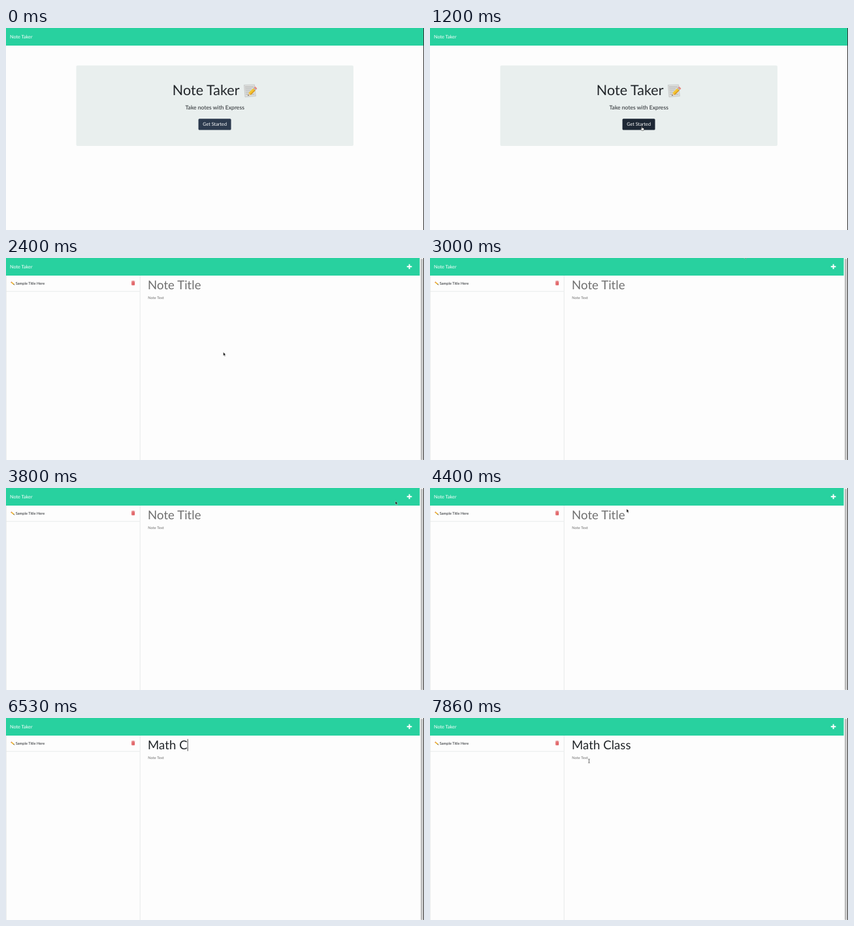
Animation of 640x310 px, one loop 8000 ms. Source, as an HTML page:

```html
<!DOCTYPE html>
<html lang="en">
<head>
<meta charset="utf-8">
<title>Note Taker</title>
<style>
  html, body { margin: 0; width: 100%; height: 100%; overflow: hidden; background: #fdfdfd; }
  svg { display: block; width: 100vw; height: 100vh; }
  text { font-family: Lato, sans-serif; fill: #212529; white-space: pre; text-rendering: geometricPrecision; }
  .middle { text-anchor: middle; }
  .light { fill: #fff; }
  .hint { fill: #707070; }
</style>
</head>
<body>
<svg viewBox="0 0 640 310">
  <rect width="640" height="310" fill="#fdfdfd"/>
  <rect id="bar" width="639" height="27" fill="#28d19f"/>
  <text class="light" x="6" y="16" font-size="7.25">Note Taker</text>

  <g id="home">
    <rect x="107.5" y="57.5" width="424.5" height="123.5" rx="2" fill="#e9efee"/>
    <text x="254.8" y="102.8" font-size="21.6">Note Taker</text>
    <g id="memo">
      <path d="M364.5 87.5L380.5 87L382.5 104.5L366 106Z" fill="#dcdddb" stroke="#b9bcba" stroke-width=".6"/>
      <path d="M366 90.5h13M366.3 93.3h10M366.6 96.1h8M366.9 98.9h5M367.2 101.7h13" stroke="#a5a8a8" stroke-width=".8"/>
      <g transform="translate(370.3 104) rotate(-45)">
        <path d="M0 0L4.4 -2.4V2.4Z" fill="#e9c99b"/>
        <path d="M0 0L1.6 -.9V.9Z" fill="#333"/>
        <rect x="4" y="-2.4" width="10" height="4.8" fill="#f5c52f"/>
        <rect x="4" y=".8" width="10" height="1.6" fill="#d99a22"/>
        <rect x="14" y="-2.4" width="1.6" height="4.8" fill="#b3b6b8"/>
        <rect x="15.6" y="-2.4" width="2.4" height="4.8" rx="1" fill="#e58a84"/>
      </g>
    </g>
    <text class="middle" x="319.7" y="124.8" font-size="8.65">Take notes with Express</text>
    <rect id="ring" x="294" y="138.5" width="51" height="18.8" rx="2" fill="none" stroke="#6b7889" stroke-width="1.4"/>
    <rect id="button" x="294.6" y="139.2" width="50" height="17.4" rx="1.6"/>
    <text class="middle light" x="319.6" y="150.4" font-size="7.3">Get Started</text>
  </g>

  <g id="notes">
    <rect x="633.7" width="6.3" height="310" fill="#f3f3f3"/>
    <rect x="635.1" y="1" width="3.2" height="309" rx="1.6" fill="#bdbdbd"/>
    <path d="M.3 27V310M205.3 27V310M0 51.2H205" stroke="#dfe2e3" stroke-width=".7"/>
    <path d="M617.6 9.4V17M613.8 13.2H621.4" stroke="#fff" stroke-width="1.9"/>
    <g transform="translate(8 36.7) rotate(40)">
      <rect width="5" height="1.9" y="-.7" fill="#efb92d"/>
      <rect width="1" height="1.9" y="-.7" fill="#de817a"/>
      <path d="M5 -.7L7.4 .25L5 1.2Z" fill="#6b5535"/>
    </g>
    <text x="14.7" y="41.2" font-size="5.75">Sample Title Here</text>
    <g fill="#dc4b4f">
      <path d="M191.9 35.5H193.4L193.8 35H195.6L196 35.5H197.5V36.3H191.9Z"/>
      <path d="M192.3 36.7H197.1V41Q197.1 41.7 196.5 41.7H192.9Q192.3 41.7 192.3 41Z"/>
      <path d="M193.5 37.5V41M194.7 37.5V41M195.9 37.5V41" stroke="#f2b5b5" stroke-width=".4"/>
    </g>
    <text id="title" x="217" y="48.3" font-size="18.7"></text>
    <text class="hint" x="217.3" y="63" font-size="5.75">Note Text</text>
    <rect id="caret" width=".8" fill="#222"/>
  </g>
  <path d="M639.5 0V310" stroke="#333"/>

  <g id="cursor">
    <path id="arrow" d="M0 0V5.5L1.3 4.4L2.2 6.4L3.1 6L2.2 4H3.9Z" fill="#111" stroke="#fff" stroke-width=".4"/>
    <path id="hand" d="M-1.2 .5V-2.8Q-.7 -3.5 -.2 -2.8V-.6Q.5 -1.1 .9 -.4Q1.5 -.8 1.9 -.1Q2.7 -.2 2.7 .6V1.6L1.9 3.2H-.9L-2.5 1Q-2.3 .1 -1.2 .8Z" fill="#fff" stroke="#111" stroke-width=".55"/>
    <path id="beam" d="M-1.2 -3Q0 -3 0 -2.4Q0 -3 1.2 -3M0 -2.4V2.4M-1.2 3Q0 3 0 2.4Q0 3 1.2 3" fill="none" stroke="#333" stroke-width=".7"/>
  </g>
</svg>
<script>
const LOOP = 8000, PAGE_AT = 2400, FOCUS_AT = 5400;
const $ = id => document.getElementById(id);

// Pointer stops: time, x, y
const path = [
  [60, 334, 289], [860, 327, 160], [1000, 326, 155], [1200, 325, 154], [1460, 324, 153.5],
  [2000, 324, 153.5], [2330, 323, 153.5], [2730, 440, 46], [2860, 452, 36], [3000, 481, -5],
  [3270, 481, -5], [3660, 627, 19], [3740, 627, 19], [4060, 303, 29], [4200, 302, 29],
  [4400, 301, 32], [4860, 274, 53], [4940, 274, 53], [5130, 274, 43], [7530, 243.5, 66]
];
// Pointer shapes by start time
const shapes = [[0, ""], [60, "arrow"], [930, "hand"], [PAGE_AT, "arrow"], [4600, "beam"], [FOCUS_AT, ""], [7530, "beam"]];
const titles = [
  [0, "Note Title"], [5460, "M"], [5530, "Ma"], [5730, "Mat"], [5860, "Math"], [6130, "Math "],
  [6330, "Math C"], [6800, "Math Cl"], [6930, "Math Cla"], [7060, "Math Clas"], [7200, "Math Class"]
];

const clamp = v => Math.min(1, Math.max(0, v));
const mix = (a, b, k) => a + (b - a) * k;
const latest = (list, t) => list.findLast(item => item[0] <= t);
const show = (id, on) => $(id).style.display = on ? "" : "none";

function pointerAt(t) {
  const next = path.findIndex(p => p[0] > t);
  if (next === 0) return path[0].slice(1);
  if (next < 0 || path[next][0] === 7530) return path.at(next < 0 ? -1 : next - 1).slice(1);
  const [a, b] = [path[next - 1], path[next]];
  const k = (t - a[0]) / (b[0] - a[0]), eased = k * k * (3 - 2 * k);
  return [mix(a[1], b[1], eased), mix(a[2], b[2], eased)];
}

function drawTitle(t) {
  const text = latest(titles, t)[1], title = $("title");
  if (title.textContent !== text) title.textContent = text;
  title.setAttribute("class", t < 5460 ? "hint" : "");
  const inBody = t >= 7530;
  show("caret", t >= FOCUS_AT && t < 7860);
  const typed = t >= 5460 && !inBody ? title.getComputedTextLength() : 0;
  const caret = $("caret");
  caret.setAttribute("x", 217.2 + typed);
  caret.setAttribute("y", inBody ? 57.3 : 32.3);
  caret.setAttribute("height", inBody ? 7.4 : 18.4);
}

function draw(t) {
  const onNotes = t >= PAGE_AT;
  show("home", !onNotes);
  show("notes", onNotes);
  $("bar").setAttribute("width", onNotes ? 633.7 : 639);

  const hover = clamp((t - 900) / 150);
  const from = [44, 58, 78], to = [29, 39, 52];
  $("button").setAttribute("fill", `rgb(${from.map((c, i) => Math.round(mix(c, to[i], hover)))})`);
  $("ring").setAttribute("opacity", clamp((t - 2000) / 150));

  drawTitle(t);
  const shape = latest(shapes, t)[1];
  for (const id of ["arrow", "hand", "beam"]) show(id, id === shape);
  $("cursor").setAttribute("transform", `translate(${pointerAt(t)})`);
}

function tick() {
  draw(performance.now() % LOOP);
  requestAnimationFrame(tick);
}
tick();
</script>
</body>
</html>
```
